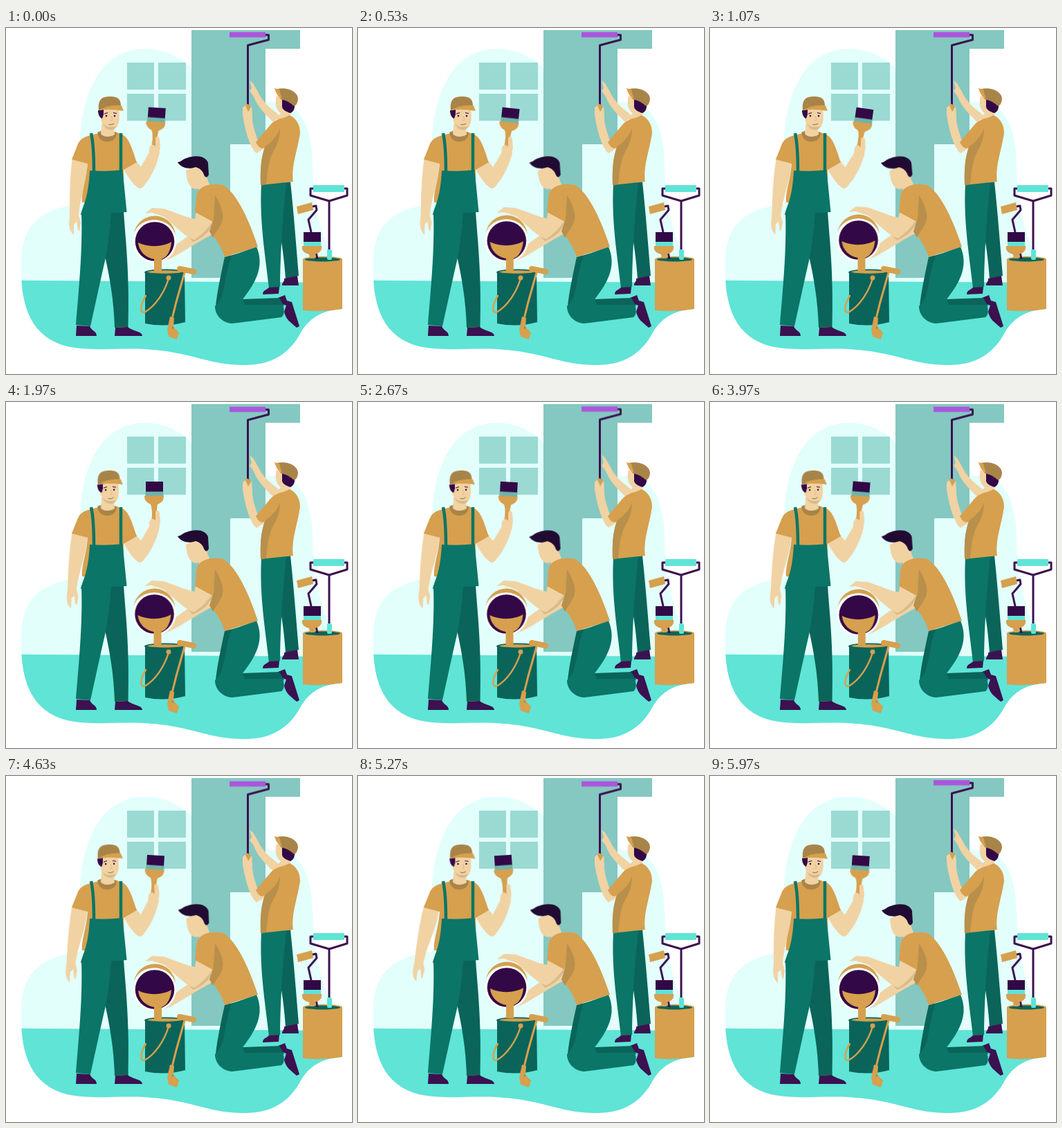
An HTML page without scripts for the animation above (6000 ms loop, 500 by 500 pixels).

```html
<!DOCTYPE html>
<html lang="en">
<head>
<meta charset="utf-8">
<title>Painters at work</title>
<style>
html, body { margin: 0; width: 100%; height: 100%; overflow: hidden; background: #fff; }
svg { display: block; width: 100%; height: 100%; }

.gold { fill: #d6a04e; }
.tan { fill: #a98449; }
.fold { fill: #b98f4c; }
.skin { fill: #f1d2a3; }
.shade { fill: #d8bb8b; }
.green { fill: #0b7567; }
.deep { fill: #0a6459; }
.ink { fill: #330846; }
.hair { fill: #220b33; }
.shoe { fill: #3c1150; }
.aqua { fill: #5fe4d6; }
.wire { fill: none; stroke: #3c1150; stroke-width: 3; stroke-linejoin: round; }
.rod { fill: none; stroke: #d6a04e; stroke-width: 3; stroke-linecap: round; }

.move { animation: 6s ease-in-out infinite; }
.arm { animation-name: arm; transform-origin: 107px 185px; }
.forearm { animation-name: forearm; transform-origin: 193px 222px; }
.brush { animation-name: brush; transform-origin: 214px 170px; }
.head { animation-name: head; transform-origin: 150px 155px; }
.nod { animation-name: nod; transform-origin: 282px 232px; }
.pour { animation-name: pour; }
.reach { animation-name: reach; }

@keyframes arm {
  0%, 100% { transform: rotate(0); }
  17.83% { transform: rotate(1.8deg); animation-timing-function: linear; }
  32.83% { transform: rotate(2deg); animation-timing-function: linear; }
  55.5% { transform: rotate(2.4deg); animation-timing-function: linear; }
  77.17% { transform: rotate(3deg); }
  87.83% { transform: rotate(7deg); }
}
@keyframes forearm {
  0%, 32.83%, 100% { transform: rotate(0); }
  17.83%, 55.5% { transform: rotate(2deg); }
  77.17%, 87.83% { transform: rotate(-1.5deg); }
}
@keyframes brush {
  0%, 100% { transform: rotate(4deg); }
  17.83% { transform: rotate(6deg); }
  32.83% { transform: rotate(0); }
  55.5% { transform: rotate(3.7deg); }
  77.17% { transform: rotate(5deg); }
  87.83% { transform: rotate(-2.5deg); }
}
@keyframes head {
  0%, 17.83%, 100% { transform: rotate(0); }
  32.83%, 77.17% { transform: rotate(-1.8deg); }
  87.83% { transform: rotate(-1deg); }
}
@keyframes nod {
  0%, 32.83%, 100% { transform: rotate(0); }
  17.83% { transform: rotate(-1.5deg); }
  55.5% { transform: rotate(-2deg); }
  77.17%, 87.83% { transform: rotate(1deg); }
}
@keyframes pour {
  0%, 77.17%, 100% { transform: translate(0, 0); }
  17.83%, 32.83%, 55.5% { transform: translate(-.5px, -2px); }
  87.83% { transform: translate(0, -3px); }
}
@keyframes reach {
  0%, 17.83%, 55.5%, 100% { transform: translateY(0); }
  32.83% { transform: translateY(1px); }
  77.17%, 87.83% { transform: translateY(1.7px); }
}
</style>
</head>
<body>
<svg viewBox="0 0 500 500" xmlns="http://www.w3.org/2000/svg">
  <defs>
    <clipPath id="blob">
      <path d="M22 350C20 300 35 262 107 254C114 240 106 215 107 170C108 90 140 30 200 30C235 30 258 45 285 75C325 107 370 104 392 108C425 110 442 140 443 200C444 265 460 310 478 345L486 406C455 408 438 420 426 440C410 470 385 487 345 487C290 487 270 468 200 464C160 462 130 468 88 460C38 447 22 405 22 350Z"/>
    </clipPath>
  </defs>

  <!-- room -->
  <g clip-path="url(#blob)">
    <path fill="#e2fffc" d="M0 0H500V500H0Z"/>
    <path class="aqua" d="M0 364.500L500 368V500H0Z"/>
  </g>
  <path fill="#9adad2" d="M175 50h39v39h-39zM220 50h40v39h-40zM175 95h39v39h-39zM220 95h40v39h-40z"/>
  <path fill="#84c8c1" d="M268 3H425V30H375V168H324V361H268Z"/>

  <!-- tool barrel -->
  <g>
    <path class="gold" d="M429 334H486V406Q458 411 429 408Z"/>
    <ellipse class="gold" cx="457.5" cy="334" rx="28.5" ry="4"/>
    <ellipse class="deep" cx="457.5" cy="334.5" rx="25.5" ry="3"/>
    <path class="wire" d="M445 232H440V242L467 250L493 242V232H488M467 250V324"/>
    <rect class="aqua" x="444" y="227" width="45" height="10" rx="1"/>
    <rect class="aqua" x="464" y="320" width="7" height="15" rx="2"/>
    <path class="wire" d="M443 258L448 257L449 263L437 277L441 295M448 324L450 334"/>
    <path class="gold" d="M420 258L442 252L444 263L422 269Z"/>
    <path class="ink" d="M430 295H455V309H430Z"/>
    <path class="aqua" d="M430 309H455V315H430Z"/>
    <path class="gold" d="M428 315H456C457 323 452 325 447 327L446 333H439L438 327C431 325 427 322 428 315Z"/>
  </g>

  <!-- painter with the long roller -->
  <g>
    <path class="deep" d="M402 224L411 222C416 270 419 310 423 358L404 362C402 335 399 310 394 290Z"/>
    <path class="green" d="M369 226L405 222C402 260 397 300 396 374L380 376C375 330 366 280 369 226Z"/>
    <path class="shoe" d="M380 375L395 374L394 384L371 385C371 379 376 379 380 375ZM402 362L421 358L423 372L399 372C399 367 403 366 402 362Z"/>
    <g class="move reach">
      <path class="wire" d="M375 10H379.500V17L349.500 25V112"/>
      <rect x="323" y="6" width="52" height="7.5" fill="#ab56db"/>
      <path class="skin" d="M352 76L357 80L364 92C372 110 388 120 396 127L386 136C374 124 362 112 358 99L352 91L355 87Z"/>
      <path class="gold" d="M347 109L354 112L350 125L345 122Z"/>
      <path class="skin" d="M342 115L346 112L350 121L355 113L356 126C355 137 360 150 363 160L376 172L362 181C351 172 344 140 342 125Z"/>
    </g>
    <path class="skin" d="M391 98L400 101L402 114L411 123L409 132L390 132L397 123C390 119 388 108 391 98Z"/>
    <path class="ink" d="M399 102L417 108C418 115 416 121 411 123C405 121 398 118 399 112Z"/>
    <path class="tan" d="M392 88C405 85 422 91 422 103C421 110 418 114 415 112C410 107 403 104 397 103L394 97Z"/>
    <path class="gold" d="M388 87L395 89L399 103C394 100 390 95 388 87Z"/>
    <path class="gold" d="M361 165L382 140C387 134 394 131 401 130L410 126C420 131 425 140 425 152C421 178 412 200 415 222L368 227C367 202 369 186 374 172C369 177 364 171 361 165Z"/>
    <path class="fold" d="M396 145C392 158 382 165 374 172C369 187 367 202 368 227L376 226C378 205 380 190 386 179C393 168 396 157 396 145Z"/>
  </g>

  <!-- kneeling painter -->
  <g>
    <path class="shoe" d="M393 390L403 386L406 394L413 396L424 431L420 433C411 425 404 421 402 410L405 401L396 398Z"/>
    <path class="deep" d="M340 392L395 390L402 402L335 408ZM316 331L335 326L320 400L303 402C305 380 312 350 316 331Z"/>
    <path class="green" d="M326 329L362 316C372 340 366 362 342 392L345 400L400 400C403 410 402 415 398 418L327 427C312 426 302 415 302 402C318 390 314 360 326 329Z"/>
    <g class="move nod">
      <path class="skin" d="M260 206L274 199L287 208L294 226L278 242L279 232C266 236 261 222 260 206Z"/>
      <path class="hair" d="M248 194C254 193 256 189 261 188C274 183 289 185 292 195L293 212C291 216 288 217 286 212C284 205 278 202 274 201C264 205 253 202 248 194Z"/>
    </g>

    <!-- standing bucket -->
    <path class="deep" d="M201 353H258L259 425Q230 433 201 427Z"/>
    <ellipse class="deep" cx="229.5" cy="353" rx="29.500" ry="4.5"/>
    <ellipse class="gold" cx="229.5" cy="352.5" rx="25" ry="2.2"/>
    <path class="rod" d="M235 362C229 382 216 402 200 411C193 412 194 400 202 387" style="stroke-width:2.5"/>
    <circle class="gold" cx="235" cy="361" r="3.5"/>
    <path class="rod" d="M259 350L246 396L240 420"/>
    <path class="rod" d="M251 348L271 352" style="stroke-width:8"/>
    <path class="gold" d="M237 417L243 419L242 432L250 440L247 450L235 446L233 436Z"/>
    <circle class="tan" cx="241" cy="433" r="1.5"/>

    <g class="move pour">
      <path class="skin" d="M227 330C238 317 254 308 265 299L298 288L299 298C282 306 254 325 238 333L228 337Z"/>
      <path class="gold" d="M185 297A30.200 30.200 0 0 1 245 300C238 271 193 270 185 297Z"/>
      <circle cx="215" cy="308.5" r="29.5" fill="none" stroke="#fff" stroke-width="3"/>
      <circle class="ink" cx="215" cy="308.5" r="28.3"/>
      <path class="gold" d="M191 310C204 317 226 317 239 309C238 322 233 331 225 334V353H214V334C202 332 192 323 191 310Z"/>
      <path class="shade" d="M264 302L285 290L300 278C297 294 283 304 270 309Z"/>
      <path class="skin" d="M201 268L211 260L228 261C245 267 262 274 273 276L275 264L300 277C292 290 282 300 272 306C259 302 243 285 229 273L211 267Z"/>
    </g>
    <path class="gold" d="M276 240C280 226 300 224 314 227C335 240 352 280 364 316L316 331C311 316 305 306 296 297L299 280L273 266C275 255 274 249 276 240Z"/>
    <path class="fold" d="M302 242C311 255 316 270 312 281C307 292 301 298 299 303L294 294L300 276Z"/>
  </g>

  <!-- painter with the brush -->
  <g>
    <g class="move arm">
      <path class="skin" d="M96 187L118 192C118 220 108 240 105 271L108 281L106 294L104 292L102 280L98 284L98 299C92 294 90 287 92 272C92 245 92 215 96 187Z"/>
    </g>
    <path class="deep" d="M142 325L150 264H170C172 300 179 350 176.500 432L157 433C156 395 150 360 142 325Z"/>
    <path class="green" d="M109 267L152 266C150 295 147 318 144 332C137 362 130 395 122 431L101 429C105 380 111 320 109 267Z"/>
    <path class="shoe" d="M102 430L121 431C124 438 131 438 131 445H101ZM158 433L176 432C182 438 197 438 197 445H157Z"/>

    <path class="skin" d="M170 204L188 192L205 213C202 226 198 232 193 232C184 228 177 216 170 204Z"/>
    <g class="move forearm">
      <path class="skin" d="M193 232C184 225 186 214 193 204L208 178L222 180C219 197 206 226 193 232Z"/>
      <g class="move brush">
        <path class="ink" d="M202 115H227V130H202Z"/>
        <path fill="#6eb4ab" d="M201.500 129.500H227.500V136H201.500Z"/>
        <path class="gold" d="M200 135.500H228C228 143 225 145 219 148C217 157 218 167 218 176C217 184 210 183 210 176C211 166 212 156 209 148C203 145 200 142 200 135.500Z"/>
      </g>
      <path class="skin" d="M207 181C206 172 209 168 213 169L216 171L216 159C218 155 222 157 222 161L223 172L221 184Z"/>
    </g>

    <path class="gold" d="M134 152C120 156 108 156 103 170L95 190L118 196C116 222 109 235 110 252H120L170 238V205L189 194C183 178 179 159 168 154L158 150Z"/>
    <path class="tan" d="M132 151C138 147 152 147 160 152C159 168 134 169 132 151Z"/>
    <path d="M123 152Q127 170 127 208M166 152V208" fill="none" stroke="#0b7567" stroke-width="4.500"/>
    <path class="green" d="M121 206Q146 208 168.500 205L174.500 266L108 270C111 256 119 248 121 206Z"/>

    <g class="move head">
      <path class="skin" d="M139 134L156 142L157 154C151 158 141 158 137 153Z"/>
      <path class="skin" d="M137 117H163C165 130 164 146 153 147C145 147 139 140 137 131Z"/>
      <path class="shade" d="M140 138C145 144 152 144 159 142C157 150 144 149 140 138Z"/>
      <path class="ink" d="M133 119L141 118V125L139 131L136 129Q133 125 133 119Z"/>
      <path d="M142 124L147 122.500M155 122.500L160 123.500" fill="none" stroke="#330846" stroke-width="1.200"/>
      <circle class="ink" cx="145" cy="127" r="1.300"/>
      <circle class="ink" cx="157" cy="127" r="1.300"/>
      <path d="M152 127L154 133L151 134" fill="none" stroke="#d8bb8b"/>
      <path d="M148 139Q152 141 156 138" fill="none" stroke="#a98449" stroke-width="1.200"/>
      <path class="tan" d="M134 119C133 104 137 99 151 99C163 99 166 104 166 113Q149 114 134 119Z"/>
      <path class="gold" d="M134 119Q148 110 167 112L170 120Q150 116 134 119Z"/>
    </g>
  </g>
</svg>
</body>
</html>
```
